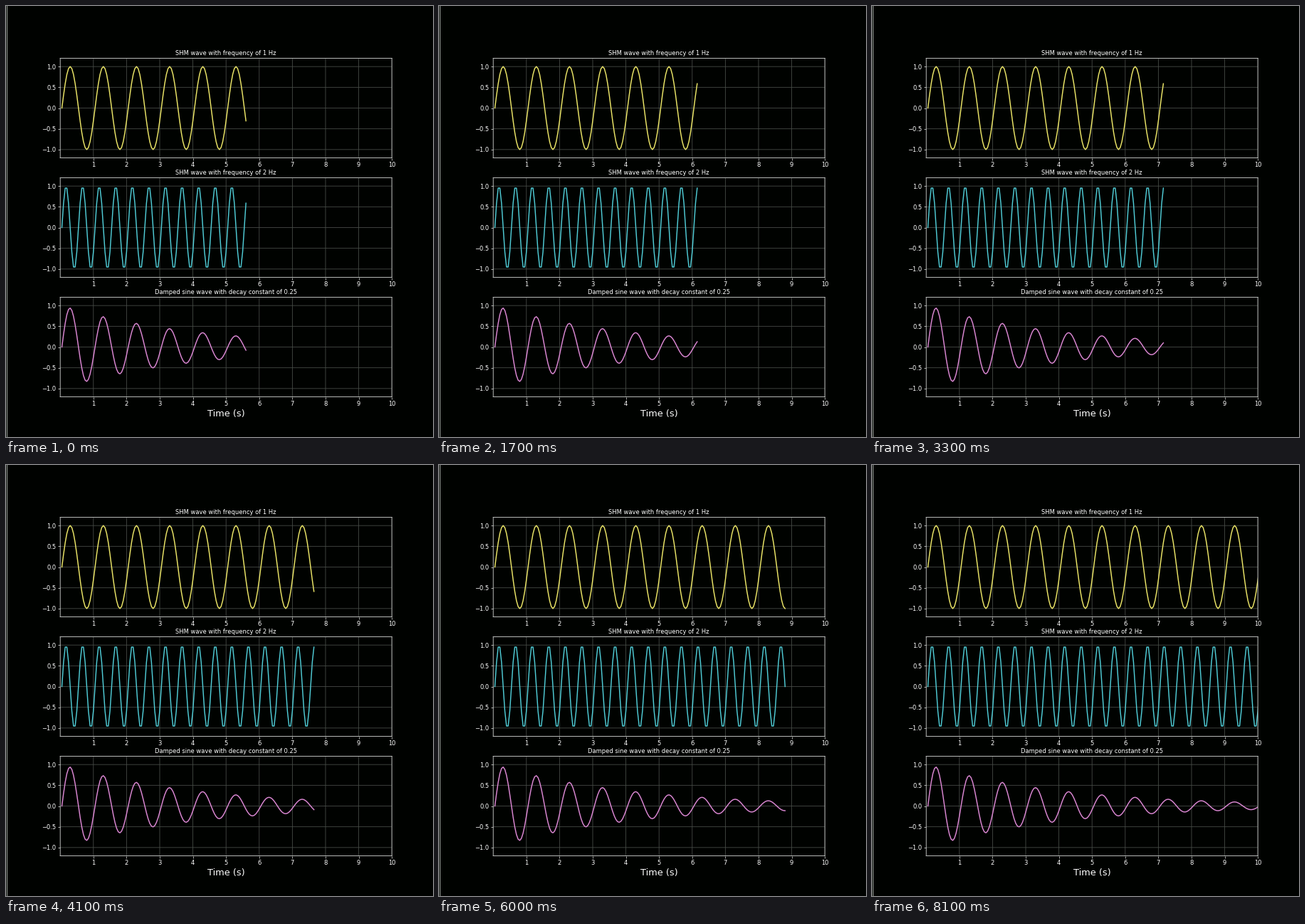
Animation, 600 px wide and 606 px high, one loop 8.3 s. Source, as a matplotlib script:

```python
import numpy as np
import matplotlib.pyplot as plt
from matplotlib.animation import FuncAnimation
from matplotlib.lines import Line2D

WIDTH, HEIGHT, DPI = 600, 606, 60
FRAMES, INTERVAL = 83, 100
STEP = 0.05
HOLD = 10  # frames before the curves start to grow
BACKGROUND = "#000200"

plt.style.use("dark_background")
plt.rcParams.update({
    "font.family": "DejaVu Sans",
    "font.size": 10,
    "axes.linewidth": 1.1,
    "axes.edgecolor": "#c8cac8",
    "axes.facecolor": BACKGROUND,
    "axes.titlepad": 5,
    "grid.color": "#484c48",
    "grid.linewidth": 1.0,
})

elapsed = np.arange(0, 10.3, STEP)
time = elapsed + STEP


def sine(frequency):
    return np.sin(2 * np.pi * frequency * elapsed)


WAVES = [
    ("SHM wave with frequency of 1 Hz", sine(1), "#ece668"),
    ("SHM wave with frequency of 2 Hz", sine(2), "#50ccd6"),
    ("Damped sine wave with decay constant of 0.25",
     np.exp(-0.25 * elapsed) * sine(1), "#dc88d4"),
]

fig = plt.figure(figsize=(WIDTH / DPI, HEIGHT / DPI), dpi=DPI,
                 facecolor=BACKGROUND)


def add_panel(row, title, color):
    bottom = HEIGHT - 213.5 - 168 * row
    ax = fig.add_axes([76.2 / WIDTH, bottom / HEIGHT,
                       466 / WIDTH, 140 / HEIGHT])
    ax.set(xlim=(0, 10), ylim=(-1.2, 1.2),
           xticks=range(1, 11), yticks=np.arange(-1, 1.1, 0.5))
    ax.set_title(title, fontsize=10.1)
    ax.grid(True, snap=False)
    for spine in ax.spines.values():
        spine.set_snap(False)
    return ax.plot([], [], color=color, lw=1.75)[0]


lines = [add_panel(row, title, color)
         for row, (title, _, color) in enumerate(WAVES)]
fig.text(309 / WIDTH, (HEIGHT - 577) / HEIGHT, "Time (s)",
         fontsize=15.5, ha="center", va="baseline")
fig.add_artist(Line2D([0.5 / WIDTH] * 2, [0, 1], color="#a0a6a0", lw=1.2))


def sample_count(frame):
    """Five new samples every four frames once the hold is over."""
    if frame <= HOLD:
        return 112 + frame // HOLD
    return 113 + 5 * (frame - HOLD + 1) // 4


def update(frame):
    count = sample_count(frame)
    for line, (_, values, _) in zip(lines, WAVES):
        line.set_data(time[:count], values[:count])
    return lines


anim = FuncAnimation(fig, update, frames=FRAMES, interval=INTERVAL,
                     repeat=True, repeat_delay=0)
plt.show()
```
